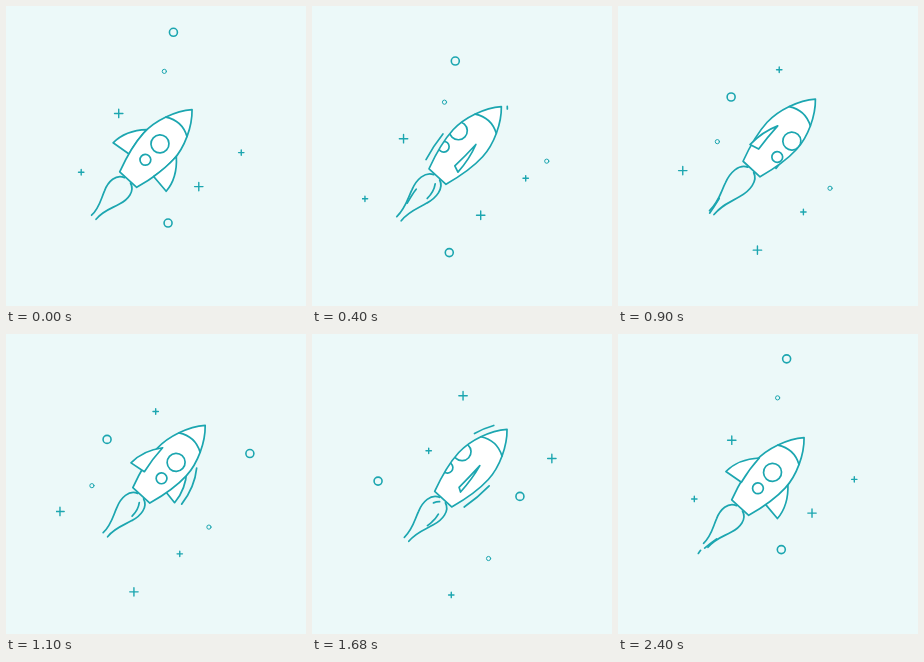
An HTML page that plays this animation: 300x300 px, repeating every 2420 ms.

```html
<!DOCTYPE html>
<html lang="en">
<head>
<meta charset="utf-8">
<title>Rocket</title>
<style>
  html, body { margin: 0; width: 100%; height: 100%; overflow: hidden; background: #ecf9f9; }
  svg { display: block; width: 100vw; height: 100vh; }
  .ink { fill: none; stroke: #1ca6b0; stroke-width: 1.7; stroke-linecap: round; stroke-linejoin: round; }
  .white { fill: #fff; }
</style>
</head>
<body>
<svg viewBox="0 0 300 300">
  <defs>
    <clipPath id="strip"><rect x="50" width="200" height="300"/></clipPath>
    <clipPath id="inside"><use href="#hull"/></clipPath>
    <path id="hull" d="M-11.5 0C-16 -14 -20 -30 -20 -45C-20 -62 -11.5 -82.5 0 -94.7C11.5 -82.5 20 -62 20 -45C20 -30 16 -14 11.5 0Z"/>
  </defs>
  <g id="sky" class="ink" clip-path="url(#strip)"></g>
  <g id="rocket" class="ink">
    <g id="flame"></g>
    <g id="back"></g>
    <use href="#hull" fill="#fff" stroke="none"/>
    <g id="ports" clip-path="url(#inside)"></g>
    <path d="M-14.3 -71.5Q0 -80 14.3 -71.5"/>
    <use href="#hull"/>
    <g id="front"></g>
    <path id="trail" d="M22.5 -57.4Q34 -42 35.7 -20.7"/>
    <g id="swirl"></g>
  </g>
</svg>
<script>
const LOOP = 2420;
const TURN = 2 * Math.PI;
const SLOPE = Math.tan(50 * Math.PI / 180);
const $ = id => document.getElementById(id);

function add(parent, tag, attrs) {
  const el = document.createElementNS('http://www.w3.org/2000/svg', tag);
  for (const k in attrs) el.setAttribute(k, attrs[k]);
  parent.appendChild(el);
  return el;
}

const show = (el, on) => el.setAttribute('visibility', on ? 'visible' : 'hidden');
const wrap = a => ((a % 360) + 540) % 360 - 180;

// Reveals only the stretch of a path between two distances.
function stretch(el, from, to) {
  const tail = Math.max(0, from);
  const len = to - tail;
  show(el, len > 0.3);
  el.setAttribute('stroke-dasharray', `${Math.max(0, len)} 999`);
  el.setAttribute('stroke-dashoffset', -tail);
}

// Drifting particles live for one loop, then return to their birthplace.
const ring = (r, w) => add($('sky'), 'circle', { r, 'stroke-width': w });
const plus = r => add($('sky'), 'path', { d: `M${-r} 0H${r}M0 ${-r}V${r}`, 'stroke-width': 1.4 });
const drifters = [
  { el: ring(4, 1.6), born: 2385, x: 169.6, y: 23.7, reach: 146, ease: 1 },
  { el: ring(4, 1.6), born: 770, x: 264.4, y: 95.1, reach: 150, ease: 1 },
  { el: ring(2.1, 1), born: 1760, x: 198, y: 18.1, reach: 157, ease: 1.06 },
  { el: ring(2.1, 1), born: 2360, x: 255.7, y: 130.2, reach: 110, ease: 1 },
  { el: plus(4.2), born: 1230, x: 173, y: 35.6, reach: 126, ease: 1.04 },
  { el: plus(4.2), born: 1210, x: 275, y: 82.6, reach: 153.3, ease: 0.9 },
  { el: plus(2.7), born: 510, x: 184.5, y: 36, reach: 137.6, ease: 0.975 },
  { el: plus(2.7), born: 1900, x: 260, y: 117.1, reach: 134, ease: 1.1 }
];

// The rocket is drawn in its own axes: base centre at 0,0 and nose upwards.
const ports = [0, 180].map(turn => {
  const el = add($('ports'), 'g', {});
  add(el, 'circle', { cy: -47.8, r: 9, class: 'white' });
  add(el, 'circle', { cy: -26.2, r: 5.4, class: 'white' });
  return { el, turn };
});
const fins = [-90, 90].map(turn => ({ el: add($('back'), 'path', { class: 'white' }), turn }));

const mirror = s => `scale(${s} 1)`;
for (const s of [-1, 1])
  add($('flame'), 'path', { d: 'M4 1C13 4 13.5 15 10 24C7 33 2.2 40 3 51', transform: mirror(s) });

// Licks slide down inside the flame.
const LICK = { speed: 0.13, length: 15, end: 62 };
const licks = [[-1, 140], [-1, 510], [-1, 1635], [-1, 1850], [1, 260], [1, 960], [1, 1480], [1, 2000]]
  .map(([s, start]) => ({
    start,
    el: add($('flame'), 'path', { d: 'M1 4C6 8 8 16 7 23C6 32 2 42 0 62', transform: mirror(s) })
  }));

// Swirls run along the outside of the hull, longest halfway.
const SWIRL = { path: 127, half: 18 };
const swirls = [
  { side: -1, start: 190, time: 650 },
  { side: -1, start: 1360, time: 400 },
  { side: -1, start: 1720, time: 350 },
  { side: -1, start: 2022, time: 350 },
  { side: 1, start: 392, time: 410, down: true },
  { side: 1, start: 1536, time: 400 },
  { side: 1, start: 1852, time: 400 }
];
for (const s of swirls)
  s.el = add($('swirl'), 'path', {
    d: 'M14.5 20.5Q15.5 12 17 5C22 -10 25 -28 25 -45C25 -66 16 -88 3 -100',
    transform: mirror(s.side)
  });

function drawFin(fin, spin) {
  const a = wrap(spin + fin.turn);
  const behind = Math.abs(a) > 90;
  const f = (behind ? Math.sign(a) * 180 - a : a) / 90;
  const home = $(behind ? 'back' : 'front');
  if (fin.el.parentNode !== home) home.appendChild(fin.el);
  fin.el.setAttribute('d',
    `M${20 * f} -49.5Q${35.4 * f} -34.5 ${36 * f} -17L${16.7 * f} -19.5Q${20 * f} -34 ${20 * f} -49.5Z`);
  return a > 98 && a < 122;
}

function drawRocket(t) {
  const phase = TURN * t / LOOP;
  const lift = (1 - Math.cos(phase)) / 2;
  $('rocket').setAttribute('transform',
    `translate(${122.2 + 13.4 * lift} ${173.6 - 12.5 * lift}) rotate(42.4)`);
  $('flame').setAttribute('transform', `scale(1 ${(55 - 4 * Math.cos(4 * phase)) / 51})`);

  const spin = -360 * t / LOOP;
  for (const { el, turn } of ports) {
    const a = wrap(spin + turn);
    show(el, Math.abs(a) < 100);
    el.setAttribute('transform', `translate(${a * 0.25 - 0.6} 0)`);
  }
  show($('trail'), fins.map(fin => drawFin(fin, spin)).includes(true));
}

function draw(t) {
  for (const { el, born, x, y, reach, ease } of drifters) {
    const age = ((t - born + LOOP) % LOOP) / LOOP;
    const d = reach * age ** ease;
    el.setAttribute('transform', `translate(${x - d} ${y + d * SLOPE})`);
  }

  drawRocket(t);

  for (const { el, start } of licks) {
    const head = (t - start) * LICK.speed;
    stretch(el, head - LICK.length, Math.min(head, LICK.end));
  }
  for (const { el, start, time, down } of swirls) {
    const p = Math.min(1, Math.max(0, (t - start) / time));
    const mid = SWIRL.path * (down ? 1 - p : p);
    const half = SWIRL.half * Math.sin(Math.PI * p);
    stretch(el, mid - half, Math.min(mid + half, SWIRL.path));
  }
}

const start = performance.now();
function tick() {
  draw((performance.now() - start) % LOOP);
  requestAnimationFrame(tick);
}
draw(0);
requestAnimationFrame(tick);
</script>
</body>
</html>
```
